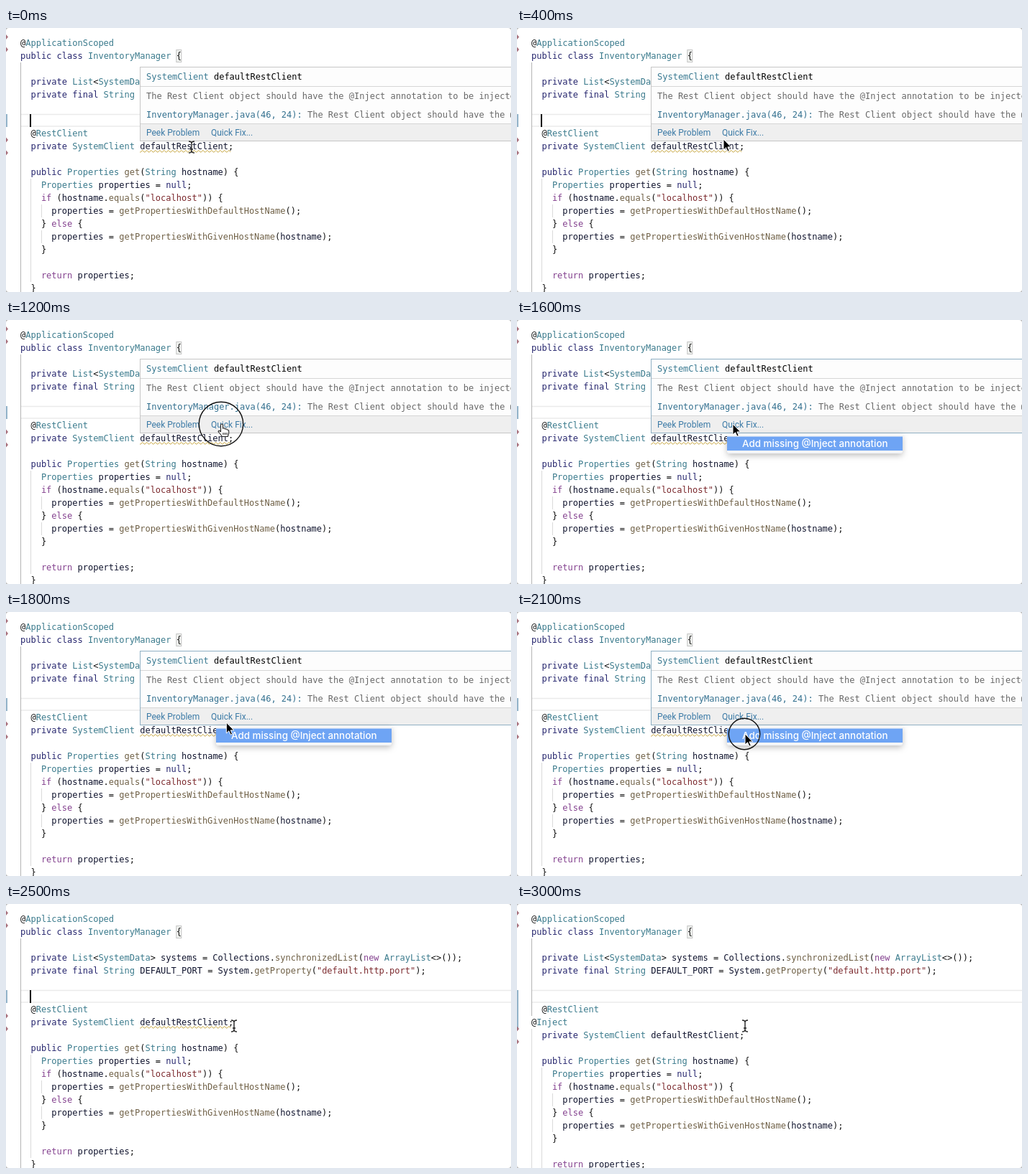
An HTML page for the animation above (3.1 s loop, 702 px wide and 368 px high).

```html
<!DOCTYPE html>
<html lang="en">
<head>
<meta charset="utf-8">
<title>Quick fix in a code editor</title>
<style>
  html, body { margin: 0; width: 100%; height: 100%; overflow: hidden; background: #fff; }
  svg { display: block; background: #b4b4b4; }
  text { font: 12px "DejaVu Sans Mono", monospace; white-space: pre; }
  .link { font: 12px Roboto, sans-serif; fill: #3b7aa6; }
  .item { font: 500 13.4px Inter, sans-serif; fill: #fff; }
  .guide { stroke: #dadada; }
  .active { stroke: #b4b4b4; }
  .mark { fill: #a8707c; }
  .cursor { stroke: #fff; stroke-width: 1; stroke-linejoin: round; }
</style>
</head>
<body>
<svg width="702" height="368" viewBox="0 0 702 368">
  <defs>
    <filter id="soft" x="-20%" y="-60%" width="140%" height="260%">
      <feDropShadow dx="0" dy="3" stdDeviation="4" flood-opacity=".25"/>
    </filter>
  </defs>
  <rect width="702" height="368" rx="4" fill="#fff"/>
  <path d="M20 120.5H702M20 137H702" stroke="#ebebeb" stroke-width="1.3"/>
  <rect x="236.8" y="30.5" width="7" height="17" fill="#f1f3f0" stroke="#c4c4c4"/>
  <path class="mark" d="M0 9l3 3.5-3 3.5zM0 26.5l3 3.5-3 3.5z"/>
  <rect id="change" y="120" width="2" height="18" fill="#94b4ca"/>
  <path class="active" d="M20.5 48V156"/>
  <path id="classGuide"/>
  <g id="upper"></g>
  <g id="lower">
    <path class="mark" d="M0 152.5l3 3.5-3 3.5zM0 170.5l3 3.5-3 3.5z"/>
    <path class="guide" d="M34.5 210V354M49.5 246V264M49.5 282V300"/>
    <path id="squiggle" fill="none" stroke="#cdb056"/>
  </g>
  <g id="inserted"></g>
  <rect id="caret" x="33" y="120" width="2" height="18"/>

  <g id="hover">
    <rect id="frame" x="186.5" y="54.5" width="530" height="103" fill="#fdfdfd"/>
    <path d="M187 134H702V157H187z" fill="#efefef"/>
    <path d="M187 81.5H702M187 133.5H702" stroke="#d6d6d6"/>
    <text x="195" y="72"><tspan fill="#3a7a92">SystemClient</tspan> defaultRestClient</text>
    <g fill="#686868">
      <text x="195" y="99">The Rest Client object should have the @Inject annotation to be injected</text>
      <text x="195" y="125"><tspan fill="#33708f">InventoryManager.java(46, 24):</tspan> The Rest Client object should have the @Inject</text>
    </g>
    <text class="link" x="195" y="150">Peek Problem</text>
    <text class="link" x="285" y="150">Quick Fix...</text>
  </g>

  <g id="menu">
    <rect x="292" y="158.5" width="244" height="27.5" rx="4" fill="#f4f5f7" filter="url(#soft)"/>
    <rect x="292" y="162.5" width="244" height="19.5" fill="#6ea4f4"/>
    <text class="item" x="313" y="177">Add missing @Inject annotation</text>
  </g>

  <circle id="ring" fill="none" stroke="#111" stroke-width="1.4"/>
  <g id="pointer">
    <path id="beam" d="M-4-8Q0-8 0-5Q0-8 4-8M0-5V5M-4 8Q0 8 0 5Q0 8 4 8M-2 3H2" fill="none" stroke="#222" stroke-width="1.4"/>
    <path id="arrow" class="cursor" d="M0 0V15L3.5 11.7 6 17.2 8.3 16.2 5.9 10.9H10.6Z"/>
    <path id="hand" d="M-1.5 1.5Q-1.5 0 0 0Q1.5 0 1.5 1.5V6Q4 5.2 4.5 7Q7 6.3 7.3 8Q9.7 7.8 9.7 10V13Q9 15 8.3 17.5H.5Q-2 14-5 10.5Q-4.5 8.2-1.5 10.5Z M2 12V15M4.5 12V15M7 12V15" fill="#fff" stroke="#222" stroke-width="1.1"/>
  </g>
</svg>
<script>
const $ = id => document.getElementById(id);
const CHAR = 7.224, ROW = 18, LEFT = 20, LOOP = 3100, STEP = 100;

const code = `@ApplicationScoped
public class InventoryManager {

  private List<SystemData> systems = Collections.synchronizedList(new ArrayList<>());
  private final String DEFAULT_PORT = System.getProperty("default.http.port");


  @RestClient
  private SystemClient defaultRestClient;

  public Properties get(String hostname) {
    Properties properties = null;
    if (hostname.equals("localhost")) {
      properties = getPropertiesWithDefaultHostName();
    } else {
      properties = getPropertiesWithGivenHostName(hostname);
    }

    return properties;
  }`.split("\n");

function colour(token, next) {
  if (token[0] === '"') return "#7c2a2e";
  if (/^(public|private|class|final|null)$/.test(token)) return "#26266e";
  if (/^(if|else|return|new)$/.test(token)) return "#84428f";
  if (next === "(" && /^\w/.test(token)) return "#6f6046";
  if (/^(System|Collections)$/.test(token)) return "#10142e";
  if (/^[A-Z]\w*[a-z]/.test(token)) return "#3a7a8c";
  return /^\w/.test(token) ? "#10142e" : "#111";
}

function codeLine(line, row) {
  const body = line.trimStart();
  const x = LEFT + (line.length - body.length) * CHAR;
  const spans = body.replace(/"[^"]*"|\w+|[^\w"]+/g, (token, at) =>
    `<tspan fill="${colour(token, body[at + token.length])}">${token.replace(/</g, "&lt;")}</tspan>`);
  return `<text x="${x}" y="${25 + row * ROW}">${spans}</text>`;
}

code.forEach((line, row) =>
  $(row < 8 ? "upper" : "lower").insertAdjacentHTML("beforeend", codeLine(line, row)));
$("inserted").innerHTML = codeLine("@Inject", 8);

let wave = "M186 173";
for (let x = 186; x < 309; x += 6) wave += "l1.5 0 1.5-2.2 1.5 0 1.5 2.2";
$("squiggle").setAttribute("d", wave);

// time, x, y of the pointer's hot spot
const path = [[0, 258, 166], [200, 263, 165], [400, 287, 155], [700, 300, 145],
              [1600, 300, 145], [1700, 301, 146], [2000, 317, 170], [LOOP, 317, 170]];
const clicks = [1100, 2100];

function pointerAt(t) {
  const i = path.findIndex(p => p[0] > t);
  const [t0, x0, y0] = path[i - 1], [t1, x1, y1] = path[i];
  const k = (t - t0) / (t1 - t0);
  return [x0 + (x1 - x0) * k, y0 + (y1 - y0) * k];
}

const show = (id, on) => $(id).style.display = on ? "" : "none";

function draw(t) {
  const fixed = t >= 2600, settled = t >= 2800, open = t < 2300;
  const [x, y] = pointerAt(t);

  show("hover", open);
  $("frame").setAttribute("stroke", t >= 1300 ? "#8fb0c4" : "#c6c6c6");
  show("menu", t >= 1600 && open);
  show("caret", t < 700 || (t >= 2300 && !settled));

  show("inserted", fixed);
  show("squiggle", !settled);
  $("lower").setAttribute("transform", `translate(0 ${fixed ? ROW : 0})`);
  $("classGuide").setAttribute("class", fixed ? "guide" : "active");
  $("classGuide").setAttribute("d", `M20.5 ${fixed ? 174 : 156}V368`);
  $("change").setAttribute("height", settled ? 54 : 18);

  const kind = t < 300 || !open ? "beam" : t >= 500 && t < 1600 ? "hand" : "arrow";
  for (const id of ["beam", "arrow", "hand"]) show(id, id === kind);
  $("pointer").setAttribute("transform", `translate(${x} ${y})`);

  const age = Math.min(...clicks.map(c => t < c ? Infinity : t - c));
  show("ring", age < 300);
  if (age < 300) {
    $("ring").setAttribute("r", 21.7 + age * .09);
    $("ring").setAttribute("cx", x - 1);
    $("ring").setAttribute("cy", y);
    $("ring").setAttribute("opacity", age > 100 ? .4 : 1);
  }
}

const start = performance.now();
function tick() {
  const t = (performance.now() - start) % LOOP;
  draw(Math.floor(t / STEP) * STEP);
  requestAnimationFrame(tick);
}
tick();
</script>
</body>
</html>
```
